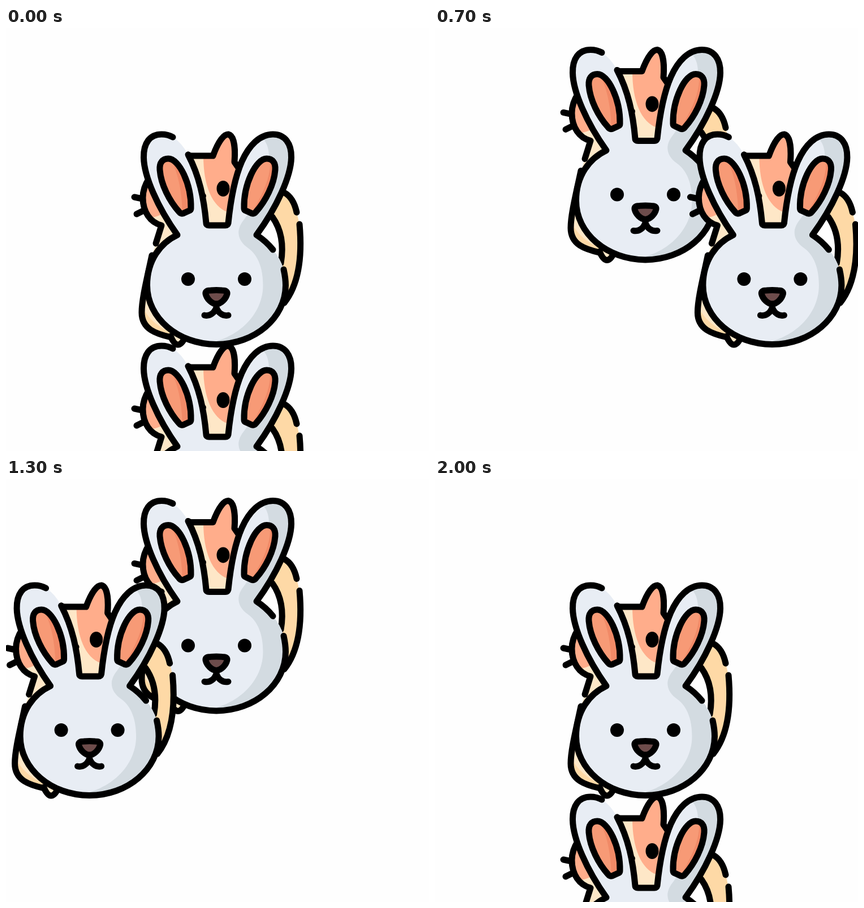
Write an HTML page with a canvas that moves like this. It is 748 by 748 pixels and loops after 2.1 s.

```html
<!DOCTYPE html>
<html lang="en">
<head>
<meta charset="utf-8">
<title>Crossing rabbits</title>
<style>
html, body { margin: 0; width: 100%; height: 100%; overflow: hidden; background: #fefefe; }
canvas { display: block; width: 748px; height: 748px; }
</style>
</head>
<body>
<canvas id="stage" width="748" height="748"></canvas>
<script>
const ctx = document.getElementById('stage').getContext('2d');
const SIZE = 748, STEP = 100, STEPS = 21;

const color = {
  paper: '#fefefe', ink: '#000', fur: '#e8edf4', furShade: '#d3dbe1',
  ear: '#f79a76', earShade: '#f18a67', nose: '#6d4c4b',
  cream: '#fee7c7', sand: '#fed9a6', peach: '#ffad8b'
};

const earLeft = 'C288 189 281 188 275 188 C254 188 243 204 243.5 229 C244 262 268 317 303 366';
const headLeft = 'C273 380 249.5 411 249.5 455 C249.5 512.7 304.4 559.5 372 559.5 C439.6 559.5 494.5 512.7 494.5 455 C494.5 445 493 436 491 427';
const earRight = 'L443 366 C479 317 504 262 504.5 229 C505 204 493 188 472 188 C449 188 430 207 417 236 C403 268 397 306 393 345 Q392 349 388 349 L359 349 Q354 349 354 345 C350 301 342 262 322 224';

const rabbit = {
  fill: new Path2D(`M295 193 ${earLeft} ${headLeft} Q485 407 472 392 ${earRight} Q311 203 295 193Z`),
  shade: new Path2D('M434 188 C454 188 466 204 465 231 C463 262 445 308 420 340 C404 360 412 378 428 389 C446 402 454.5 425 454.5 455 C454.5 512.7 399.6 559.5 332 559.5 L520 570 V180Z'),
  lines: new Path2D(`M295 193 ${earLeft} ${headLeft} M472 392 Q460 377 443 366 ${earRight}`),
  inner: new Path2D('M287 231 C306 231 328 276 327 319 Q327 322 324 323 L313 328 Q309 329 306 325 C289 306 274 277 272 251 C271 238 277 231 287 231Z'),
  nose: new Path2D('M353 470 Q352 464 362 464 Q372 463 382 464 Q392 464 391 470 C389 479 380 488 372 488 C364 488 355 479 353 470Z'),
  mouth: new Path2D('M372 488 V494 M351 508 C360 510 369 504 372 494 C375 504 384 510 393 508')
};
const bandLeft = new Path2D('M287 225 C302 247 312 285 312 335 H340 V225Z');
const bandRight = new Path2D('M466 225 C473 262 449 302 430 335 H490 V225Z');

const cat = {
  face: new Path2D('M322 224 H366 L404 237 L420 250 L395 349 H352Z'),
  patch: new Path2D('M349 226 H366 C373 207 383 188 393 188 C403 190 406 211 404 237 L417 252 L393 326 C364 316 349 278 349 226Z'),
  muzzle: new Path2D('M253 266 C245 278 242 288 242 300 C242 325 255 344 275 349 L265 381 L258 402 L310 370Z'),
  cheek: new Path2D('M253 266 C245 278 242 288 242 300 C242 314 247 326 255 335 Q267 335 284 325Z'),
  body: new Path2D('M258 402 C250 440 240 479 240 503 C240 533 266 541 292 547 L320 540 L270 400Z'),
  bodyLight: new Path2D('M240 490 C250 514 270 530 300 543 L320 540 L260 440Z'),
  foot: new Path2D('M291 545 C295 554 299 560 304 560 C309 560 313 555 317 546'),
  tail: new Path2D('M492 291 C505 298 511 312 514 326 L519 347 C524 402 519 452 492 486 L480 440 C494 400 491 363 470 333Z'),
  lines: new Path2D('M322 224 Q324 226 328 226 H366 C373 207 383 188 393 188 C403 190 406 211 404 237 L413 250 ' +
    'M253 266 C245 278 242 288 242 300 C242 325 255 344 275 349 L265 381 ' +
    'M227 299 L241 302 M231 329 L243 323 ' +
    'M258 402 C250 440 240 479 240 503 C240 533 266 541 292 547 ' +
    'M492 291 C505 298 511 312 514 326 M519 347 C524 402 519 452 492 486 ' +
    'M471 334 C488 358 491 387 486 416')
};

function fill(path, c) {
  ctx.fillStyle = c;
  ctx.fill(path);
}

function dot(x, y, rx, ry = rx) {
  ctx.fillStyle = color.ink;
  ctx.beginPath();
  ctx.ellipse(x, y, rx, ry, 0, 0, Math.PI * 2);
  ctx.fill();
}

function shaded(path, base, shade, dark) {
  fill(path, base);
  ctx.save();
  ctx.clip(path);
  fill(shade, dark);
  ctx.restore();
}

function drawCat() {
  fill(cat.tail, color.sand);
  shaded(cat.body, color.sand, cat.bodyLight, color.cream);
  fill(cat.foot, color.cream);
  fill(cat.muzzle, color.cream);
  fill(cat.cheek, color.peach);
  fill(cat.face, color.cream);
  fill(cat.patch, color.peach);
  ctx.stroke(cat.lines);
  ctx.stroke(cat.foot);
  dot(384, 284, 11.5, 14);
}

function drawRabbit() {
  shaded(rabbit.fill, color.fur, rabbit.shade, color.furShade);
  ctx.stroke(rabbit.lines);
  dot(349, 297, 5);

  shaded(rabbit.inner, color.ear, bandLeft, color.earShade);
  ctx.stroke(rabbit.inner);
  const mirrored = new Path2D();
  mirrored.addPath(rabbit.inner, new DOMMatrix([-1, 0, 0, 1, 748, 0]));
  shaded(mirrored, color.ear, bandRight, color.earShade);
  ctx.stroke(mirrored);

  dot(322, 444, 12);
  dot(422, 444, 12);
  fill(rabbit.nose, color.nose);
  ctx.stroke(rabbit.nose);
  ctx.stroke(rabbit.mouth);
}

function drawPair(x, y) {
  ctx.save();
  ctx.translate(x, y);
  ctx.strokeStyle = color.ink;
  ctx.lineWidth = 11;
  ctx.lineCap = ctx.lineJoin = 'round';
  drawCat();
  drawRabbit();
  ctx.restore();
}

// Triangle wave: 1 at step 0, -1 at step 10, 1 again at step 20.
function wave(n) {
  return Math.abs(((n % 20) + 20) % 20 - 10) / 5 - 1;
}

function draw(now) {
  const n = Math.floor(now / STEP) % STEPS;
  ctx.fillStyle = color.paper;
  ctx.fillRect(0, 0, SIZE, SIZE);
  drawPair(0, wave(n) * SIZE / 2);
  drawPair(wave(n - 5) * SIZE / 2, 0);
}

const start = performance.now();
function tick() {
  draw(performance.now() - start);
  requestAnimationFrame(tick);
}
tick();
</script>
</body>
</html>
```
